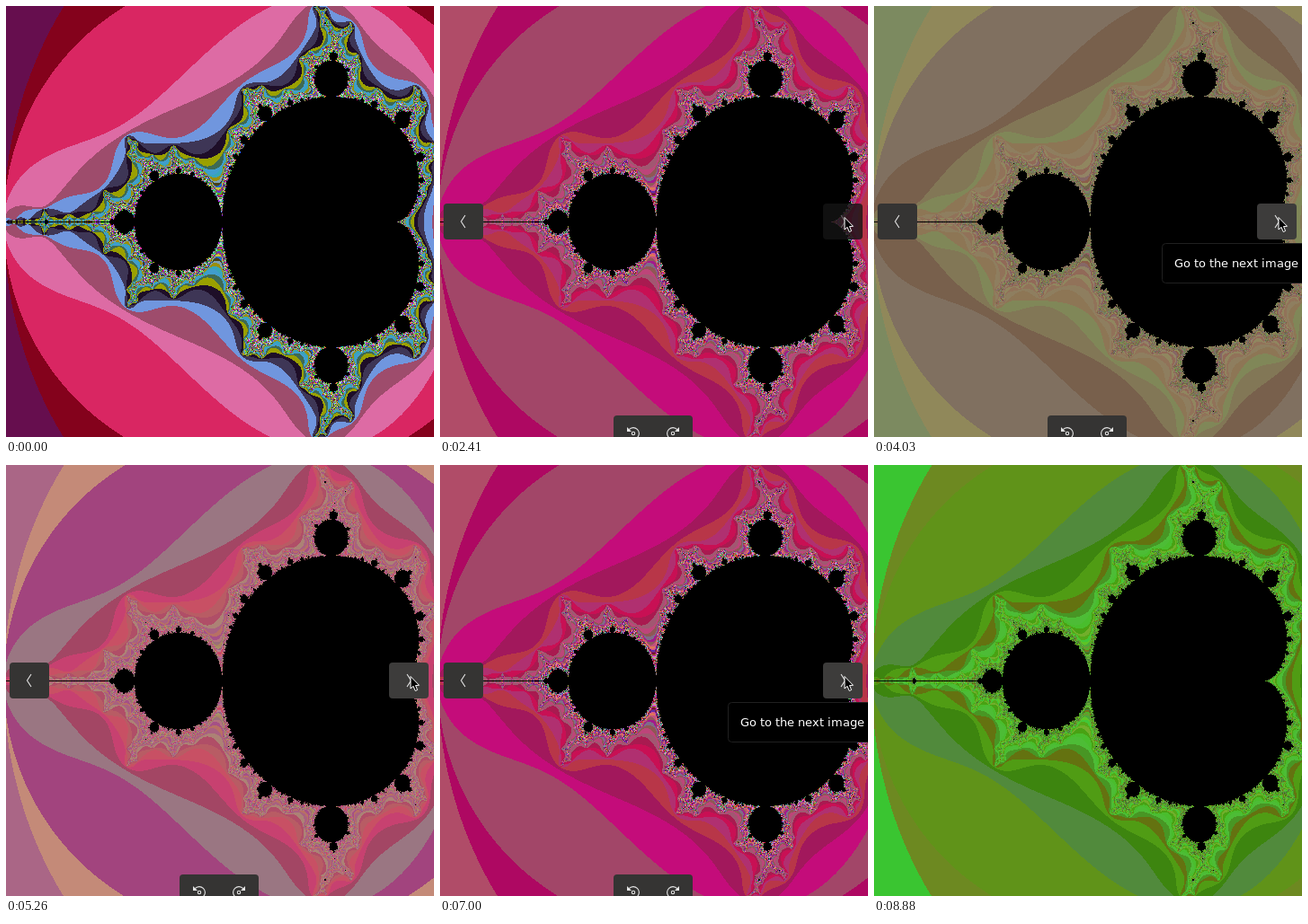
Recreate the animation shown at these times as an HTML page with a canvas. Size 476 by 480 pixels, loop 8.98 s.

```html
<!DOCTYPE html>
<html lang="en">
<head>
<meta charset="utf-8">
<title>Fractal slideshow</title>
<style>
  html, body { margin: 0; width: 100%; height: 100%; overflow: hidden; background: #000; }
  canvas { display: block; width: 476px; height: 480px; }
</style>
</head>
<body>
<canvas id="stage" width="476" height="480"></canvas>
<script>
const W = 476, H = 480, LOOP = 8980, LIMIT = 255;
const SETTLE = 130, SHOW = 560, HIDE = 8640;
const INK = '#e4e4e4', PANEL = '#353433';
const ctx = document.getElementById('stage').getContext('2d');

// Outer band colours; deeper bands are random in their range, widened by noise.
const palettes = [
  { noise: 1, keys: '660e4e 84021c d92662 dd6ba4 9e4c6c 7096de 3e3656 1e0e28 9aa000 3e6a54' },
  { noise: .1, keys: '8a5078 9a4a5c a05c88 84486c' },
  { noise: .7, keys: 'b04c68 ae0862 a24668 c40c7a a2185c b83648 b03070 c81054' },
  { noise: .1, keys: '3ac531 6d8921 609319 518a3c 3d850f 509c14 647210 489624' },
  { noise: .1, keys: '7c8a60 90885a 807060 78604c' },
  { noise: .1, keys: 'aa6686 c48a78 a2447e 9a7682 a34664 c74170 c85064 b85c64' }
];

// Each click moves to the next picture; the tooltip closes `lead` ms before it.
const clicks = [[1550, 0], [2410, 0], [3230, 140], [3890, 0], [4700, 120],
  [5410, 150], [6080, 0], [6870, 110], [7520, 0]].map(([time, lead]) => ({ time, lead }));

function escapeCount(cx, cy) {
  const q = (cx - .25) ** 2 + cy * cy;
  if (q * (q + cx - .25) <= cy * cy / 4 || (cx + 1) ** 2 + cy * cy <= 1 / 16) return LIMIT;
  let x = 0, y = 0, n = 0;
  while (n < LIMIT && x * x + y * y <= 4) {
    [x, y] = [x * x - y * y + cx, 2 * x * y + cy];
    n++;
  }
  return n;
}

function makeColors({ noise, keys }, index) {
  let seed = 7919 * (index + 3);
  const rnd = () => (seed = seed * 16807 % 2147483647) / 2147483647;
  const bands = keys.split(' ').map(hex => {
    const v = parseInt(hex, 16);
    return [v >> 16, v >> 8 & 255, v & 255];
  });
  const ranges = [0, 1, 2].map(i => {
    const values = bands.map(c => c[i]);
    return [Math.min(...values), Math.max(...values)];
  });
  const colors = [[0, 0, 0], ...bands];
  while (colors.length < LIMIT) {
    const k = noise * Math.min(1, (colors.length - bands.length) / 14);
    colors.push(ranges.map(([min, max]) => {
      const lo = min * (1 - k), hi = max + (255 - max) * k;
      return lo + rnd() * (hi - lo);
    }));
  }
  colors[LIMIT] = [0, 0, 0];
  return colors;
}

function paintFractal(colors) {
  const c = document.createElement('canvas');
  c.width = W;
  c.height = H;
  const g = c.getContext('2d');
  const img = g.createImageData(W, H);
  counts.forEach((n, i) => img.data.set([...colors[n], 255], i * 4));
  g.putImageData(img, 0, 0);
  return c;
}

// The picture is a 480 px square; its first 3 columns lie outside the stage.
const counts = Uint8Array.from({ length: W * H }, (_, i) =>
  escapeCount((i % W + 3) * 2.47 / H - 2, (Math.floor(i / W) - H / 2) * 2.24 / H));
const pictures = palettes.map((p, i) => paintFractal(makeColors(p, i)));

function trace(points) {
  ctx.beginPath();
  points.forEach(([x, y]) => ctx.lineTo(x, y));
}

function box(x, y, w, h, fill) {
  ctx.beginPath();
  ctx.roundRect(x, y, w, h, 4);
  ctx.fillStyle = fill;
  ctx.fill();
}

function button(x, dir, fill, ink) {
  box(x - 22, 220, 44, 40, fill);
  trace([[x - dir * 2, 233], [x + dir * 2.5, 240], [x - dir * 2, 247]]);
  ctx.strokeStyle = ink;
  ctx.lineWidth = 1.1;
  ctx.stroke();
}

function rotateIcon(x, dir) {
  ctx.save();
  ctx.translate(x, 476);
  ctx.scale(dir, 1);
  ctx.strokeStyle = ctx.fillStyle = INK;
  ctx.lineWidth = 1.1;
  ctx.beginPath();
  ctx.arc(0, 0, 6.4, -2.4, 2.2);
  ctx.stroke();
  ctx.beginPath();
  ctx.arc(0, 0, 1.7, 0, 7);
  ctx.stroke();
  trace([[-7, -7], [-7, -2], [-2, -2]]);
  ctx.fill();
  ctx.restore();
}

function controls(alpha, pressed) {
  ctx.globalAlpha = alpha;
  button(26, -1, PANEL, INK);
  button(448, 1, pressed ? 'rgba(20,20,20,.8)' : '#3d3c3b', pressed ? '#666' : INK);
  box(193, 456, 88, 30, PANEL);
  rotateIcon(215, 1);
  rotateIcon(259, -1);
  ctx.globalAlpha = 1;
}

function tooltip() {
  box(320.5, 264.5, 290, 44, '#000');
  ctx.strokeStyle = '#202020';
  ctx.lineWidth = 1;
  ctx.stroke();
  ctx.font = '13px "DejaVu Sans", sans-serif';
  ctx.fillStyle = '#fff';
  // Whole-pixel advances, as in a hinted desktop label.
  let x = 334;
  for (const ch of 'Go to the next image') {
    ctx.fillText(ch, x, 291);
    x += Math.round(ctx.measureText(ch).width);
  }
}

function cursor(x, y) {
  ctx.save();
  ctx.translate(x, y);
  trace([[0, 0], [0, 13.5], [3, 10.8], [5.2, 16], [7.6, 15], [5.5, 10], [9.5, 9.8]]);
  ctx.closePath();
  ctx.fillStyle = '#000';
  ctx.fill();
  ctx.strokeStyle = '#fff';
  ctx.lineWidth = 1;
  ctx.stroke();
  ctx.restore();
}

function controlsAlpha(t) {
  if (t < SHOW) return 0;
  if (t < HIDE) return Math.min(1, Math.floor((t - SHOW) / 140 + 1) / 5);
  return Math.max(0, 1 - Math.floor((t - HIDE) / 120 + 1) / 3);
}

function draw(t) {
  const done = clicks.filter(c => c.time <= t).length;
  const last = clicks[done - 1], next = clicks[done];
  const pressed = last && t < last.time + SETTLE;
  const alpha = controlsAlpha(t);
  ctx.drawImage(pictures[done % pictures.length], 0, 0);
  if (alpha) controls(alpha, pressed);
  if (last && next && !pressed && t < next.time - next.lead) tooltip();
  if (t >= SHOW && t < HIDE) cursor(t < SHOW + SETTLE ? 468 : 450, 235.5);
}

const start = performance.now();
function frame() {
  draw((performance.now() - start) % LOOP);
  requestAnimationFrame(frame);
}
frame();
</script>
</body>
</html>
```
